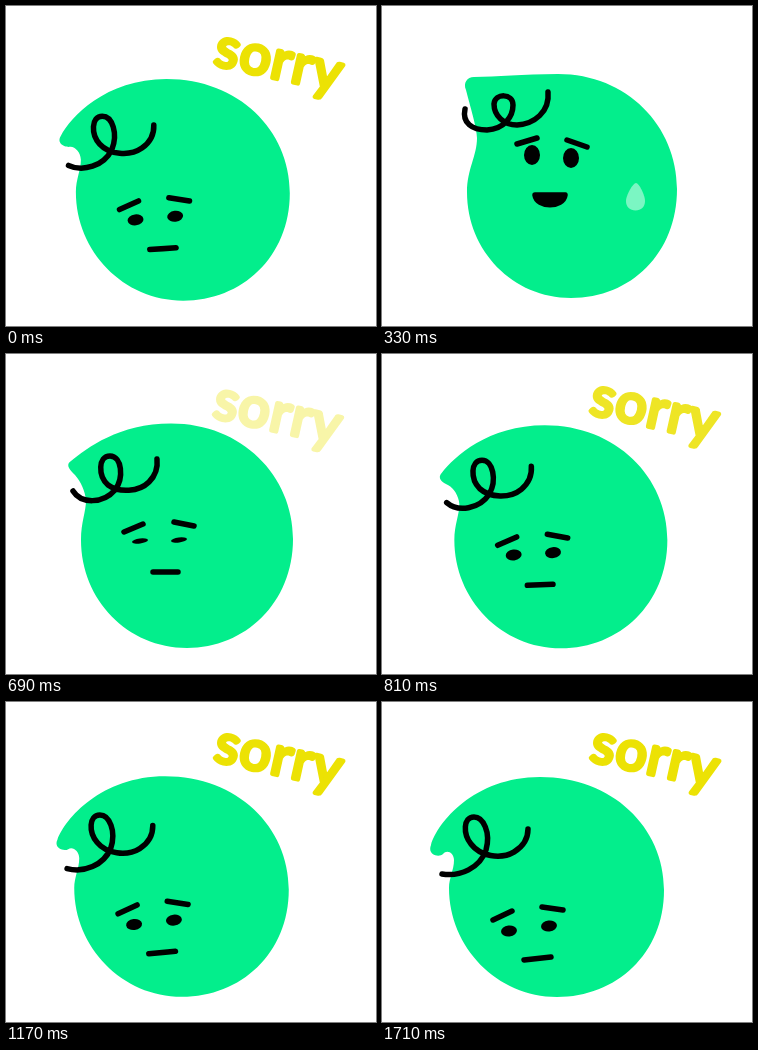
Recreate the animation shown at these times as an HTML page. Size 370 by 320 pixels, loop 1860 ms.

```html
<!DOCTYPE html>
<html lang="en">
<head>
<meta charset="utf-8">
<title>Sorry</title>
<style>
  html, body { margin: 0; width: 100%; height: 100%; overflow: hidden; background: #fff; }
  svg { display: block; width: 100vw; height: 100vh; }
  .line { fill: none; stroke: #000; stroke-width: 5.5; stroke-linecap: round; stroke-linejoin: round; }
  #mouth { fill: #000; }
  #word {
    font: 400 55px Lato, "Open Sans", sans-serif; letter-spacing: 1.2px;
    fill: #ece204; stroke: #ece204; stroke-width: 4.4; stroke-linejoin: round;
  }
</style>
</head>
<body>
<svg viewBox="0 0 370 320">
  <g id="wordMove"><text id="word" transform="translate(206.5 58.5) rotate(12.5)">sorry</text></g>
  <path id="body" fill="#03ee8c"/>
  <path id="drop" fill="#fff" d="M254 177C257 177 263 189 263 195C263 201 259 204.500 253.500 204.500C248 204.500 244 201 244 195C244 189 251 177 254 177Z"/>
  <path id="curl" class="line"/>
  <path id="brows" class="line"/>
  <path id="mouth" class="line"/>
  <ellipse id="eyeL"/>
  <ellipse id="eyeR"/>
</svg>
<script>
const LOOP = 1860, STEP = 30, LAST = 1710;
const el = id => document.getElementById(id);

// Each part has three poses: bowed, halfway and upright.
const poses = {
  body: [
    'M158 75C230 75 282 125 282 188C282 252 234 295 175 295C115 295 67 245 67 186C67 176 72 168 72 158C72 151 65 147 61 152C57 156 45 153 49 143C55 121 92 75 158 75Z',
    'M165 69.5C236 69.5 287 122 287 185C287 249 239 294 181 294C122 294 75 246 75 186C75 168 80 158 80 146C79 137 75 128 69 121C64 116 59 111 65 107C81 94 113 69.5 165 69.5Z',
    'M176 68C245 68 295 120 295 183C295 247 249 292 189 292C131 292 85 245 85 186C85 163 95 150 95 132C95 122 88 100 84 84C81 77 85 71 92 71C115 71 140 68 176 68Z'
  ],
  curl: [
    'M60 172C78 175 98 166 104 148C109 130 101 115 92 115C81 115 81 132 89 142C98 154 118 158 132 150C142 144 146 136 146 127',
    'M67 137C75 150 97 150 109 136C118 124 116 102 104 102C92 102 92 122 102 131C113 139 133 138 143 128C150 121 152 114 151 105',
    'M83 103C80 117 90 124 105 124C122 123 131 111 131 99C131 87 113 87 112 98C112 110 122 119 135 119C152 118 168 106 166 86'
  ],
  brows: [
    'M111 218L130 209M160 205L181 208',
    'M118 178L137 170M168 168L188 172',
    'M135 138L155 132M185 134L205 141'
  ],
  mouth: [
    'M142 258C151 257 160 256 169 255Z',
    'M147 218C155 218 164 218 172 218Z',
    'M153 189C155 202 181 202 183 189Z'
  ]
};
const eyes = {
  eyeL: [[127, 229], [134, 187], [150, 149]],
  eyeR: [[167, 224], [173, 186], [189, 152]]
};

// Keys are [time, value] pairs.
const rise = [[0, .36], [90, 1.15], [180, 1.75], [330, 2], [390, 2], [540, 1.5], [690, 1],
  [930, .4], [1170, .155], [1410, .045], [1710, 0]];
const eyeHeight = [[0, 5.5], [120, 10], [450, 10], [570, 7], [660, 2.5], [720, 2.5], [810, 5.5]];
const wordAlpha = [[0, 1], [120, 0], [600, 0], [690, .34], [840, 1]];
const wordDrop = [[0, 0], [120, 0], [600, 7], [690, 4.5], [840, 0]];
const dropAlpha = [[60, 0], [180, .48], [420, .48], [540, 0]];
const dropSlide = [[60, -9], [540, 7]];

const lerp = (a, b, k) => a + (b - a) * k;

function segment(keys, t) {
  let i = 0;
  while (i < keys.length - 2 && t >= keys[i + 1][0]) i++;
  const [t0] = keys[i], [t1] = keys[i + 1];
  return [i, Math.min(1, Math.max(0, (t - t0) / (t1 - t0))), t1 - t0];
}

function linear(keys, t) {
  const [i, u] = segment(keys, t);
  return lerp(keys[i][1], keys[i + 1][1], u);
}

function smooth(keys, t) {
  const [i, u, span] = segment(keys, t);
  const slope = j => {
    const a = keys[Math.max(0, j - 1)], b = keys[Math.min(keys.length - 1, j + 1)];
    return (b[1] - a[1]) / (b[0] - a[0]) * span;
  };
  const ease = u * u * (3 - 2 * u);
  return lerp(keys[i][1], keys[i + 1][1], ease)
    + u * (1 - u) * ((1 - u) * slope(i) - u * slope(i + 1));
}

function mixPath(from, to, k) {
  const number = /[\d.]+/g, target = to.match(number);
  let i = 0;
  return from.replace(number, n => lerp(+n, +target[i++], k).toFixed(2));
}

function draw(time) {
  const t = Math.min(LAST, Math.floor(time % LOOP / STEP) * STEP);
  const q = smooth(rise, t);
  const i = q < 1 ? 0 : 1, k = q - i;

  for (const id in poses) el(id).setAttribute('d', mixPath(poses[id][i], poses[id][i + 1], k));

  const ry = linear(eyeHeight, t);
  const tilt = -7 * Math.min(1, Math.max(0, 2 - q));
  for (const id in eyes) {
    const [a, b] = [eyes[id][i], eyes[id][i + 1]];
    const x = lerp(a[0], b[0], k), y = lerp(a[1], b[1], k);
    el(id).setAttribute('transform', `translate(${x} ${y}) rotate(${tilt})`);
    el(id).setAttribute('rx', 8);
    el(id).setAttribute('ry', ry);
  }

  const lift = linear(wordDrop, t);
  el('wordMove').setAttribute('transform', `translate(${-lift / 4} ${lift})`);
  el('wordMove').setAttribute('opacity', linear(wordAlpha, t));
  el('drop').setAttribute('transform', `translate(0 ${linear(dropSlide, t)})`);
  el('drop').setAttribute('opacity', linear(dropAlpha, t));
}

const start = performance.now();
function tick() {
  draw(performance.now() - start);
  requestAnimationFrame(tick);
}
tick();
</script>
</body>
</html>
```
